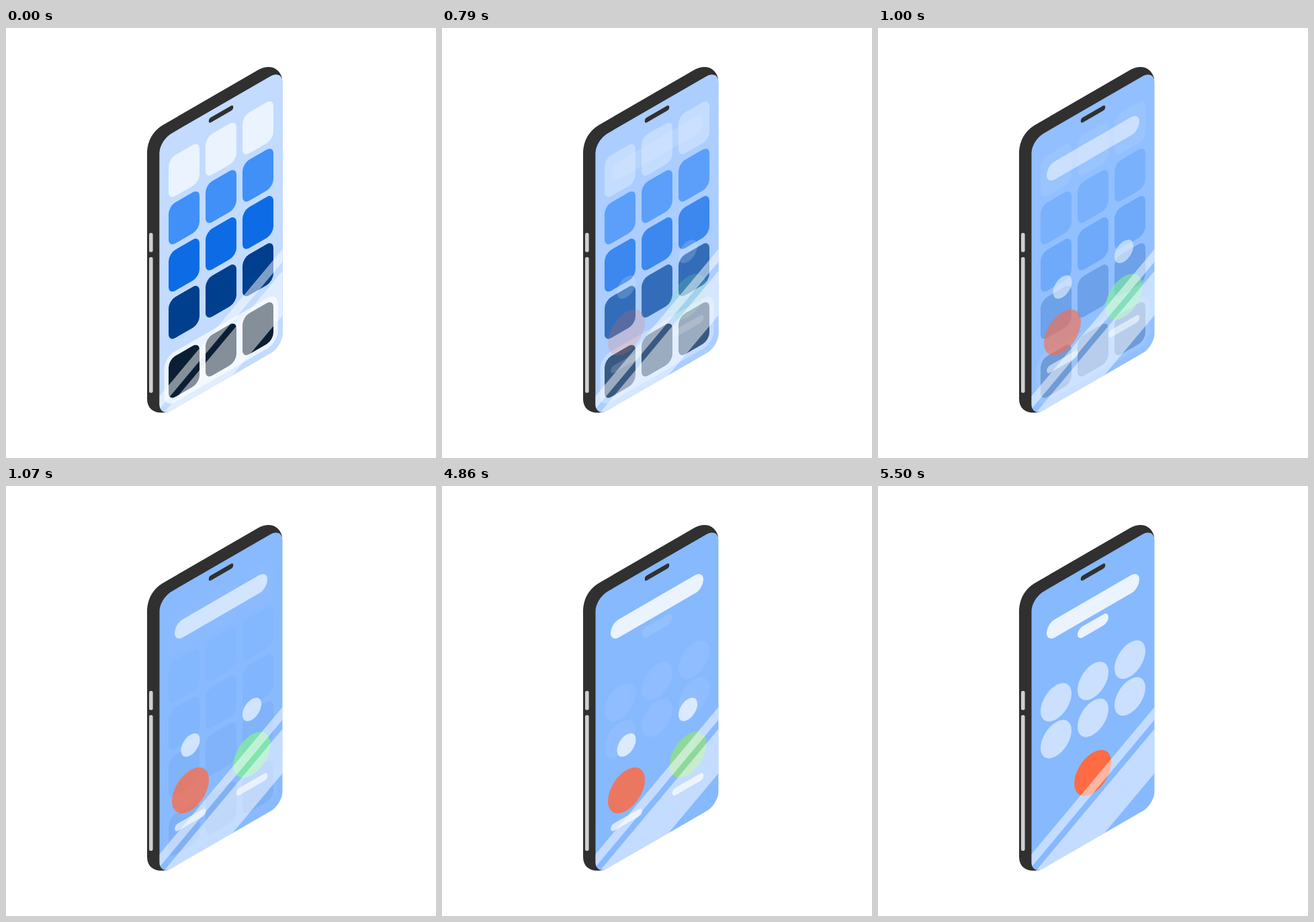
An HTML page that plays this animation: 640x640 px, repeating every 8000 ms.

```html
<!DOCTYPE html>
<html lang="en">
<head>
<meta charset="utf-8">
<title>Phone screens</title>
<style>
  html, body { margin: 0; width: 100%; height: 100%; overflow: hidden; background: #fff; }
  svg { display: block; width: 100%; height: 100%; }
</style>
</head>
<body>
<svg viewBox="0 0 640 640">
  <defs><clipPath id="glass"></clipPath></defs>
  <path fill="#303030" d="M210 188C210 166 220 152 236 143L376 62C392 53.5 407 59 411 75L400 90L300 300L242 571C224 576 210 569 210 552Z"/>
  <g fill="#d1cfce">
    <rect x="213" y="305" width="5.6" height="28.5" rx="2.3"/>
    <rect x="213" y="341" width="5.6" height="202" rx="2.3"/>
  </g>
  <g id="screen"></g>
  <g id="home"></g>
  <g id="title"></g>
  <g id="call"></g>
  <g id="keypad"></g>
  <g clip-path="url(#glass)" fill="#fff" fill-opacity=".5">
    <path d="M412 328.5V347.5L228 567.5V548.5Z"/>
    <path d="M412 361V427L228 647V581Z"/>
  </g>
  <g id="speaker"></g>
</svg>
<script>
const LOOP = 8000;
const PALE = '#eaf3fe', RED = '#ff6b43', GREEN = '#80f298';
const SLOPE = Math.tan(Math.PI / 6);
const $ = id => document.getElementById(id);

function add(parent, tag, attrs) {
  const el = document.createElementNS('http://www.w3.org/2000/svg', tag);
  for (const key in attrs) el.setAttribute(key, attrs[key]);
  return parent.appendChild(el);
}

const place = (x, y) => `translate(${x} ${y}) skewY(-30)`;

// Shapes are centred on (x, y) and lie in the plane of the screen.
function slab(parent, x, y, w, h, rx, ry, fill) {
  return add(parent, 'rect', {
    x: -w / 2, y: -h / 2, width: w, height: h, rx, ry, fill, transform: place(x, y)
  });
}

function disc(parent, x, y, r, fill, opacity = 1) {
  return add(parent, 'ellipse', {
    rx: r, ry: r * 1.103, fill, 'fill-opacity': opacity, transform: place(x, y)
  });
}

function columns(y, draw) {
  for (const dx of [-55, 0, 55]) draw(320 + dx, y - dx * SLOPE);
}

const face = [320, 320.5, 183, 412, 18, 19];
slab($('glass'), ...face);
slab($('screen'), ...face, '#87b9ff');
slab($('speaker'), 320, 128.2, 36.5, 7.5, 3.3, 3.75, '#303030');

slab($('home'), ...face, '#c2dbff');
slab($('home'), 320, 479.3, 169, 75, 15, 17, PALE);
const rows = [[180.3, PALE], [250.8, '#4090f7'], [321.2, '#0e6be6'], [391.5, '#003f8e'], [479.3, '#0a1f33']];
for (const [y, fill] of rows)
  columns(y, (x, cy) => slab($('home'), x, cy, 46, 61, 10, 11.5, fill));

slab($('title'), 320, 179, 138, 27, 12, 13.5, PALE);

disc($('call'), 274.5, 385.5, 14, PALE);
disc($('call'), 366, 332.5, 14, PALE);
disc($('call'), 274.5, 453, 27.5, RED);
disc($('call'), 366, 400, 27.5, GREEN);
slab($('call'), 274.5, 497, 46.5, 11, 5, 5.5, PALE);
slab($('call'), 366, 444, 46.5, 11, 5, 5.5, PALE);

slab($('keypad'), 320, 208.2, 46, 16.6, 7.5, 8.3, PALE);
for (const y of [290.2, 345])
  columns(y, (x, cy) => disc($('keypad'), x, cy, 23, '#fff', .57));
const hangUp = disc($('keypad'), 366, 400, 27.5, RED);

const ramp = (t, start, span) => Math.min(1, Math.max(0, (t - start) / span));

// Holds the time between the discrete steps of each transition.
function stepped(t) {
  const snap = (start, step) => start + Math.floor((t - start + 8) / step) * step;
  if (t < 640) return 0;
  if (t < 1210) return snap(640, 71.25);
  if (t < 4860) return 1210;
  if (t < 5500) return snap(4860, 71.11);
  return 5500;
}

function render(time) {
  const t = stepped(time % LOOP);
  const shown = ramp(t, 690, 500);
  const move = ramp(t, 4800, 700) ** 2;
  $('home').setAttribute('opacity', 1 - ramp(t, 590, 500));
  $('title').setAttribute('opacity', shown);
  $('call').setAttribute('opacity', shown * (1 - ramp(t, 4780, 500)));
  $('keypad').setAttribute('opacity', ramp(t, 4800, 500));
  hangUp.setAttribute('transform', place(366 - 46.3 * move, 400 + 27 * move));
}

let begin;
function tick(now) {
  begin ??= now;
  render(now - begin);
  requestAnimationFrame(tick);
}
render(0);
requestAnimationFrame(tick);
</script>
</body>
</html>
```
